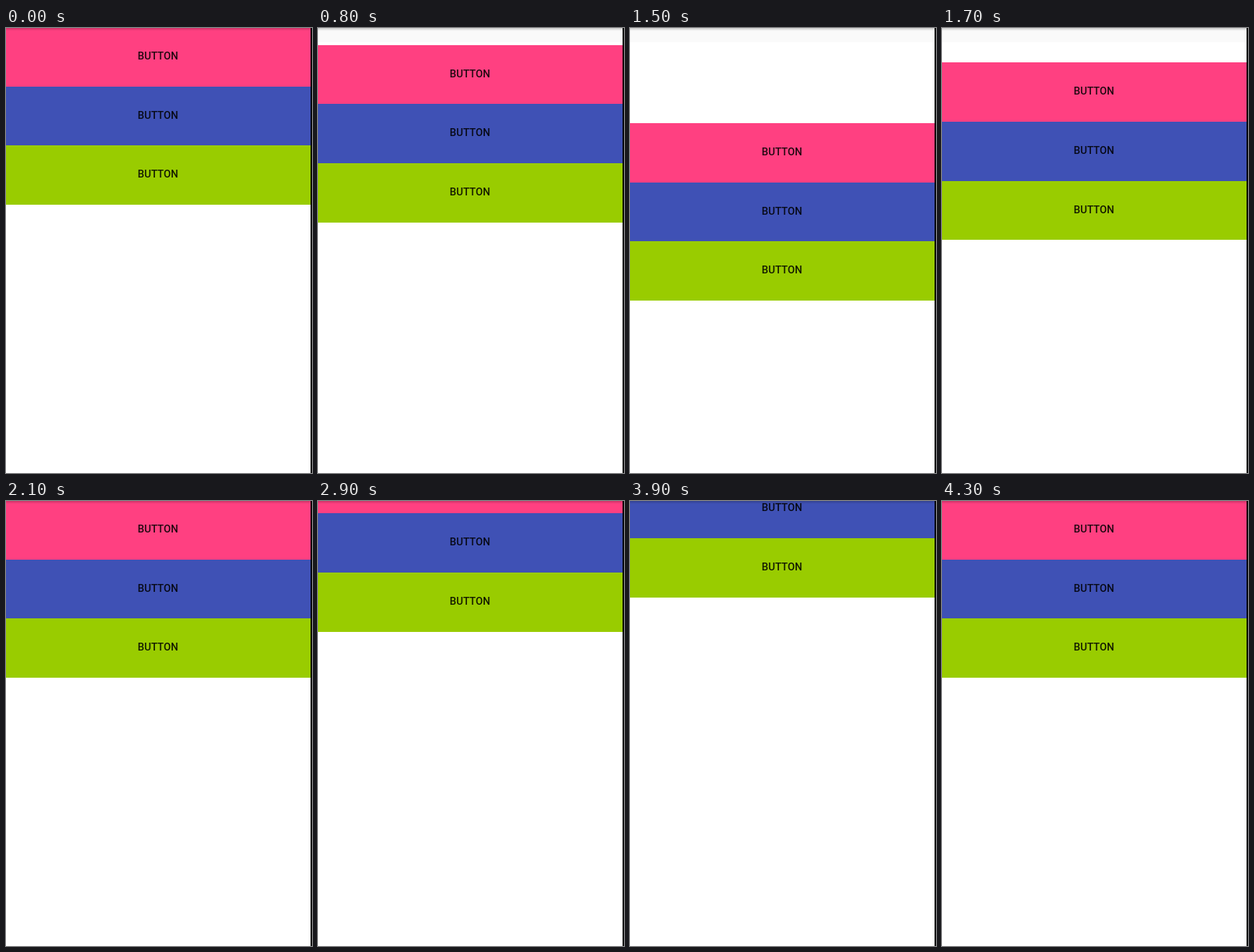
Write an HTML page that moves like this. It is 427 by 622 pixels and loops after 5.2 s.

```html
<!DOCTYPE html>
<html lang="en">
<head>
<meta charset="utf-8">
<title>Elastic scroll</title>
<style>
  html, body { margin: 0; width: 100%; height: 100%; overflow: hidden; background: #000; }
  .screen { position: absolute; left: 0; top: 0; width: 425px; height: 622px; overflow: hidden; background: #fff; }
  .strip { height: 20px; background: #fafafa; }
  .list { position: absolute; left: 0; width: 100%; }
  .item {
    height: 82.75px; text-align: center; text-indent: -1px;
    font: 500 14.48px/82.75px Roboto, sans-serif; color: rgba(0, 0, 0, .87);
  }
  .pink { background: #ff4081; }
  .blue { background: #3f51b5; }
  .green { background: #9c0; }
  .shadow {
    position: absolute; left: 0; top: 0; width: 100%; height: 4px;
    background: linear-gradient(rgba(0, 0, 0, .2), rgba(0, 0, 0, 0));
  }
</style>
</head>
<body>
<div class="screen">
  <div class="strip"></div>
  <div class="list" id="list">
    <div class="item pink">BUTTON</div>
    <div class="item blue">BUTTON</div>
    <div class="item green">BUTTON</div>
  </div>
  <div class="shadow"></div>
</div>
<script>
  const LOOP = 5200, TICK = 100, TOP = -1.1, PULL = 137, RETURN = 400;
  const list = document.getElementById('list');
  const clamp = x => Math.min(1, Math.max(0, x));

  // Damped drag, then a spring back that overshoots
  function pull(t, start, end, release, power) {
    if (t < release) {
      const x = clamp((t - start) / (end - start));
      return PULL * Math.sin(Math.PI / 2 * x ** power);
    }
    const u = clamp((t - release) / RETURN) - 1;
    return -PULL * u * u * (3 * u + 2);
  }

  // Moved by layout, so that each bar edge snaps to a whole pixel
  function draw(now) {
    const t = Math.floor(now % LOOP / TICK) * TICK;
    const y = t < 2500 ? pull(t, 600, 1600, 1635, 1.34) : -pull(t, 2536, 3700, 3885, 1);
    list.style.top = `${TOP + y}px`;
    requestAnimationFrame(draw);
  }
  draw(performance.now());
</script>
</body>
</html>
```
